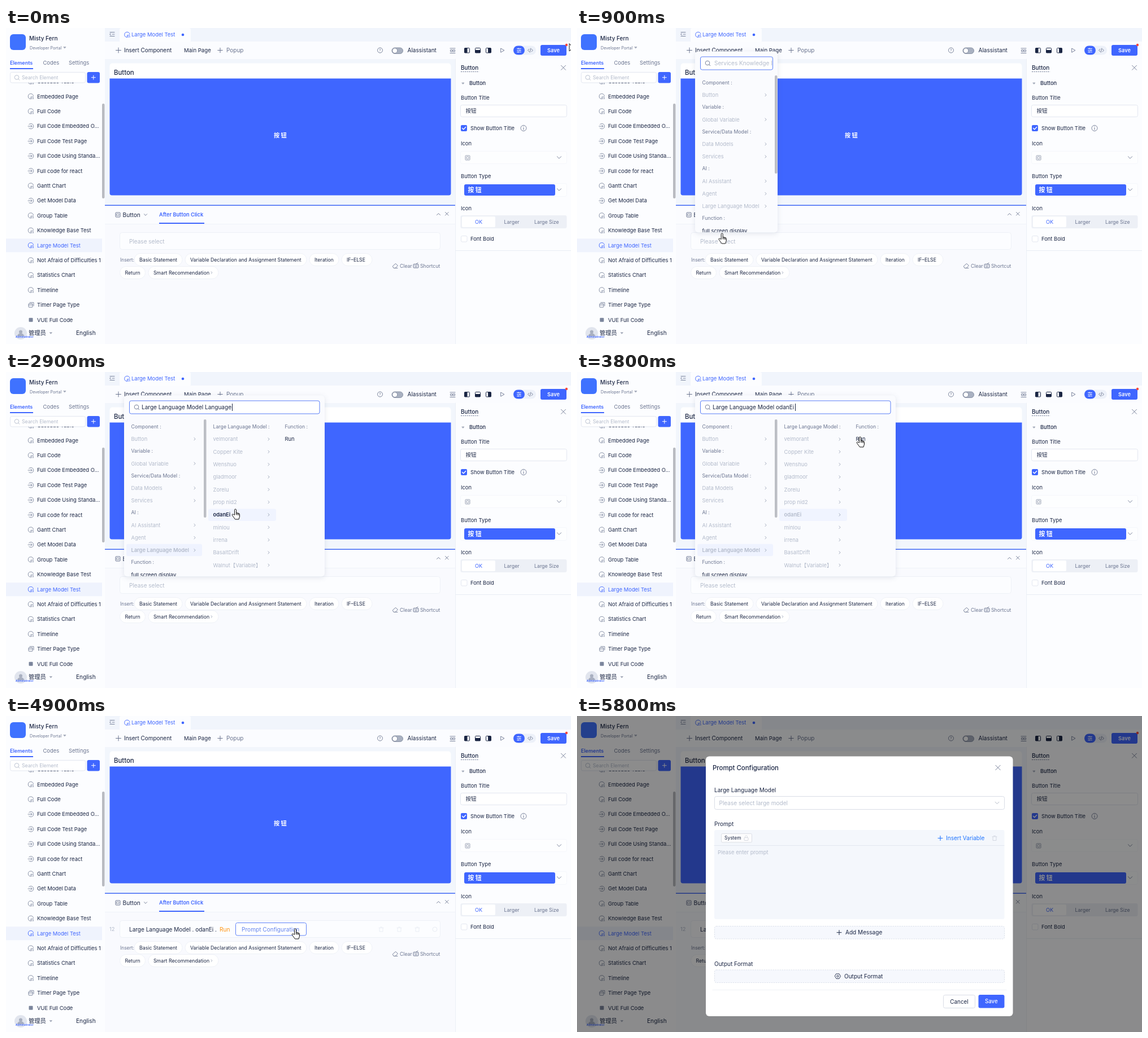
An HTML page that plays this animation: 1000x560 px, repeating every 6.1 s.

```html
<!DOCTYPE html>
<html lang="en">
<head>
<meta charset="utf-8">
<title>Prompt configuration walkthrough</title>
<style>
  html, body { margin: 0; width: 100%; height: 100%; overflow: hidden; background: #fbfcff; }
  svg { display: block; }
  text { font-family: Inter, "Noto Sans CJK SC", "Noto Sans CJK", sans-serif; white-space: pre; }
  #modal { transform-origin: 513px 380px; }
</style>
</head>
<body>
<svg id="stage" width="1000" height="560" viewBox="0 0 1000 560"></svg>
<script>
const LOOP = 6100;
const INK = '#1b2644', SOFT = '#6b7590', FADE = '#b3bbcb', BLUE = '#3f66ff', EDGE = '#e3e7f0', WHITE = '#fff';
const $ = id => document.getElementById(id);

// Drawing helpers; text is centred vertically on y.
const text = (x, y, s, size = 9.4, fill = INK, weight = 400, extra = '') =>
  `<text x="${x}" y="${y}" dy=".36em" font-size="${size}" fill="${fill}" font-weight="${weight}" ${extra}>${s}</text>`;
const rect = (x, y, w, h, fill, rx = 0, stroke = 'none', extra = '') =>
  `<rect x="${x}" y="${y}" width="${w}" height="${h}" rx="${rx}" fill="${fill}" stroke="${stroke}" ${extra}/>`;
const path = (d, stroke = SOFT, width = 1, fill = 'none') =>
  `<path d="${d}" stroke="${stroke}" stroke-width="${width}" fill="${fill}" stroke-linecap="round" stroke-linejoin="round"/>`;
const circle = (x, y, r, fill, stroke = 'none') =>
  `<circle cx="${x}" cy="${y}" r="${r}" fill="${fill}" stroke="${stroke}" stroke-width=".9"/>`;
const group = (id, body) => `<g id="${id}">${body}</g>`;
const clip = (x, y, w, h, body) =>
  `<svg x="${x}" y="${y}" width="${w}" height="${h}" viewBox="${x} ${y} ${w} ${h}">${body}</svg>`;
const plus = (x, y, r, c, w = 1) => path(`M${x - r} ${y}h${2 * r}M${x} ${y - r}v${2 * r}`, c, w);
const cross = (x, y, r, c = SOFT) => path(`M${x - r} ${y - r}l${2 * r} ${2 * r}M${x + r} ${y - r}l${-2 * r} ${2 * r}`, c, .9);
const down = (x, y, r = 3, c = SOFT) => path(`M${x - r} ${y - r / 2}l${r} ${r}l${r} ${-r}`, c, .9);
const right = (x, y, r = 2.2, c = '#98a1b5') => path(`M${x - r / 2} ${y - r}l${r} ${r}l${-r} ${r}`, c, .9);
const caretDown = (x, y) => path(`M${x - 2} ${y - 1}h4l-2 2.4z`, '#9aa2b3', .6, '#9aa2b3');
const lens = (x, y, c) => circle(x, y, 3.8, 'none', c) + path(`M${x + 2.8} ${y + 2.8}l2 2`, c);
const trash = (x, y, c) => path(`M${x - 4} ${y - 2.6}h8M${x - 1.5} ${y - 4}h3M${x - 3} ${y - 2.6}v6.6h6v-6.6`, c, .8);

const glyphs = {
  page: (x, y, c) => path(`M${x + 4.4} ${y - 1}a4.6 4.6 0 1 0 -5 5.4M${x} ${y + 4.4}v-3.6h4.4M${x + 2} ${y + 4.4}v-1.5M${x + 4.4} ${y + 4.4}v-2`, c, .9),
  code: (x, y, c) => path(`M${x - 3.4} ${y - 3.2}a4.7 4.7 0 1 1 0 6.4M${x - 5} ${y}h7M${x} ${y - 2.2}l2.2 2.2l-2.2 2.2`, c, .9),
  timer: (x, y, c) => rect(x - 4, y - 2.5, 7, 6.5, 'none', 1, c) + path(`M${x - 2} ${y - 4.5}h7v6M${x - 4} ${y}h7`, c, .9),
  plain: (x, y, c) => rect(x - 3.5, y - 3.5, 7, 7, c, 1),
};

function sidebar() {
  const items = [
    ['page', 'Cascade Table'], ['page', 'Embedded Page'], ['page', 'Full Code'], ['code', 'Full Code Embedded O...'],
    ['code', 'Full Code Test Page'], ['code', 'Full Code Using Standa...'], ['code', 'Full code for react'],
    ['page', 'Gantt Chart'], ['code', 'Get Model Data'], ['page', 'Group Table'], ['page', 'Knowledge Base Test'],
    ['page', 'Large Model Test'], ['page', 'Not Afraid of Difficulties 1'], ['page', 'Statistics Chart'],
    ['page', 'Timeline'], ['timer', 'Timer Page Type'], ['plain', 'VUE Full Code'],
  ];
  const list = items.map(([kind, label], i) => {
    const y = 94.9 + 26.4 * i, on = i === 11;
    return (on ? rect(0, y - 12, 170, 24, '#eff3fd') : '') +
      glyphs[kind](44, y, on ? BLUE : '#7b859c') + text(55, y, label, 9.4, on ? BLUE : INK);
  }).join('');
  return rect(0, 0, 175, 560, '#fcfdff') +
    rect(7, 11, 28, 28, '#3f72ff', 6) +
    text(41, 18, 'Misty Fern', 10, INK, 500) + text(42, 35, 'Developer Portal', 7.15, SOFT) + caretDown(104, 34.5) +
    text(7, 61.5, 'Elements', 9.05, BLUE, 600) + text(65.5, 61.5, 'Codes', 9.4, SOFT) + text(111, 61.5, 'Settings', 9.4, SOFT) +
    rect(7, 71, 41, 2, BLUE) +
    rect(7.5, 78.5, 133, 18.5, WHITE, 3, EDGE) + lens(19, 87.5, FADE) + text(28, 88, 'Search Element', 8.7, FADE) +
    rect(143.5, 78, 22.5, 19.5, BLUE, 3) + plus(154.8, 87.7, 3.5, WHITE) +
    clip(0, 97, 170, 429, list) + rect(170, 134, 4.5, 168, '#b9bbc1', 2) +
    circle(26, 541, 11, '#e1e5ee') + circle(26, 538.5, 3, '#a9b0c0') + path('M20 546a6 5 0 0 1 12 0z', 'none', 0, '#a9b0c0') +
    text(17, 547, 'Administrator', 4.8, BLUE, 600) + text(40, 540.5, '管理员', 10.3) + caretDown(79.5, 540.5) +
    text(124, 540.5, 'English', 10.2);
}

function header() {
  const box = (x, d) => rect(x - 4.5, 35.5, 9, 8.5, 'none', 1, INK) + path(d, INK, 1, INK);
  return rect(175, 0, 825, 24, '#f1f5fc') + rect(201, 0, 126, 25, '#fcfdff', 3) + rect(175, 24, 825, 31, '#fbfcff') +
    path('M184 7.5h8M188 11h4M184 14.5h8M185.5 9.5l-2 1.5l2 1.5', SOFT, .9) +
    glyphs.page(214.5, 12, BLUE) + text(222, 12, 'Large Model Test', 9.45, BLUE) + circle(313, 12, 2.3, BLUE) +
    plus(199, 39.5, 4.5, SOFT) + text(209, 39.5, 'Insert Component', 9.95) + text(315, 39.5, 'Main Page', 9.6) +
    plus(379, 39.5, 4.2, SOFT) + text(390, 39.5, 'Popup', 10, SOFT) +
    circle(662, 39.5, 4.5, 'none', SOFT) + text(662, 39.7, '?', 6.5, SOFT, 400, 'text-anchor="middle"') +
    rect(683, 35, 19.5, 10.5, '#a9b1c1', 5.2, '#8a93a6') + circle(688.3, 40.2, 4.4, WHITE, '#7f889d') +
    text(710.5, 39.5, 'Alassistant', 10, INK) +
    path('M786 36h9M786 44.5h9M787 38.8h3v3h-3zM791.5 38.8h3v3h-3z', SOFT, .9) +
    box(816, 'M812 36h4v7.5h-4z') + box(835, 'M831 39.5h8v4h-8z') + box(854, 'M854 36h4v7.5h-4z') +
    path('M876 36.2l6 3.4l-6 3.4z', SOFT, .9) +
    rect(898, 31.5, 40, 16, '#edf1f9', 8) + rect(898, 31.5, 20, 16, BLUE, 8) +
    path('M904.5 36.5h7M904.5 39.5h7M904.5 42.5h7M907 35.7v1.6M909.5 38.7v1.6M906.5 41.7v1.6', WHITE, .9) +
    path('M926 37.2l-2.4 2.4l2.4 2.4M930 37.2l2.4 2.4l-2.4 2.4M928.8 36l-1.6 7', SOFT, .9) +
    rect(946, 30, 46, 19, BLUE, 3) + text(969, 39.7, 'Save', 9.2, WHITE, 600, 'text-anchor="middle"') + circle(992, 30, 2.2, '#f5483f');
}

function canvasArea() {
  const handle = (x, y, w, h) => rect(x, y, w, h, WHITE, 1.2, BLUE);
  const face = fill => path('M183.5 89.5h604v203a4 4 0 0 1 -4 4h-596a4 4 0 0 1 -4 -4z', 'none', 0, fill);
  return rect(175, 55, 621, 259, '#f2f6fc') + rect(183.5, 62.5, 604, 234, WHITE, 5) +
    text(191, 79, 'Button', 11.4, INK, 500) + face(BLUE) + group('glow', face(WHITE)) +
    text(474, 190, '按 钮', 10.2, WHITE, 700) +
    group('tools',
      rect(183.5, 62.5, 604, 234, 'none', 4, BLUE) +
      rect(704, 62, 56, 21.5, BLUE, 2) + rect(761, 62, 26.5, 21.5, BLUE, 2) +
      path('M713.5 73v-4.5a1 1 0 0 1 2 0v3l3 .8v2.7l-1 2h-3.5l-2.5-3z', WHITE, .8) + text(724, 72.8, 'Events', 9.2, WHITE, 500) +
      [769, 773, 777].map(x => circle(x, 72.8, 1, WHITE)).join('') +
      handle(785.5, 179.5, 3, 9) + handle(485, 294.5, 9, 3) + handle(784, 293.5, 4, 4));
}

function statements() {
  const chip = (x, w, y, label) => rect(x, y - 11, w, 22, WHITE, 11, '#eef1f7') + text(x + 9, y, label, 8.75);
  return rect(175, 314, 621, 246, '#f9fafe') + rect(175, 315, 621, 32, '#fbfcff') + rect(175, 313.5, 621, 1.5, '#4068f5') +
    path('M175 347.5h620', '#f0f3f9', 1) +
    rect(194, 327, 8, 8, 'none', 1, SOFT) + path('M196 329.5h4v3h-4z', SOFT, .7) + text(206.5, 331, 'Button', 10.2) + down(247, 331, 2.6) +
    text(271, 331, 'After Button Click', 9.2, BLUE, 600) + rect(271, 345, 80, 2, BLUE) +
    path('M762.5 331.5l3-3l3 3', SOFT, .9) + cross(780.3, 329.3, 2.8) +
    rect(201.5, 362.5, 567, 30, '#fcfdff', 4, '#eef1f7') +
    group('rowTools', [664, 696, 728].map(x => trash(x, 378, '#e6eaf2')).join('') + circle(759, 378, 4, 'none', '#e6eaf2')) +
    group('empty', text(218, 378, 'Please select', 10, FADE)) +
    group('filled',
      text(183, 378, '12', 9.4, FADE) + text(218, 378, 'Large Language Model . odanEi .', 10) +
      text(378, 378, 'Run', 10.2, '#ff9514') +
      rect(406.5, 366.5, 125, 22.5, WHITE, 3, '#dfe3ec', 'id="promptBox"') + text(417, 378, 'Prompt Configuration', 10.1, INK, 400, 'id="promptText"')) +
    text(202, 410.5, 'Insert:', 8.4, SOFT) +
    chip(227, 85, 410.5, 'Basic Statement') + chip(317, 215, 410.5, 'Variable Declaration and Assignment Statement') +
    chip(537, 52, 410.5, 'Iteration') + chip(594, 54, 410.5, 'IF–ELSE') +
    chip(201.5, 45, 433.5, 'Return') + chip(252, 124, 433.5, 'Smart Recommendation') + right(364, 433.5, 1.8) +
    path('M684.5 422l5-4.5l4 3.5l-4.5 4.5h-2.5zM688 425.5h5', SOFT, .9) + text(697, 421.5, 'Clear', 8.65, SOFT) +
    rect(721, 418.5, 9, 6.5, 'none', 1, SOFT) + path('M723 421h5M724 423h3M726 418l3-2', SOFT, .8) + text(733, 421.5, 'Shortcut', 8.75, SOFT);
}

function inspector() {
  return rect(796, 55, 204, 505, '#fcfdff') + path('M795.5 55v505', '#eceff6') + path('M796 394.5h204', '#e9edf4') +
    text(805, 70, 'Button', 10, INK, 500) + `<path d="M805 77.5h32" stroke="${SOFT}" stroke-dasharray="2 1.5"/>` + cross(986.5, 70.3, 4) +
    caretDown(809, 98) + text(820, 98, 'Button', 9.3, INK, 500) +
    text(805, 124, 'Button Title') + rect(804.5, 136.5, 188, 21, WHITE, 3, EDGE) + text(813.5, 147, '按钮', 9.5) +
    rect(805, 172, 11, 11, BLUE, 2) + path('M807.5 177.5l2.2 2.2l4-4.3', WHITE, 1.4) +
    text(822, 178, 'Show Button Title') + circle(916, 177.5, 5, 'none', SOFT) + path('M916 177v3M916 174.8v.2', SOFT, 1) +
    text(805, 205, 'Icon') + rect(804.5, 218.5, 188, 22, '#fdfeff', 3, '#f5f7fb') +
    rect(813, 226, 8, 8, 'none', 1, '#9ca4b5') + rect(815, 228, 4, 4, 'none', .5, '#9ca4b5') + down(979, 229.5, 3.6) +
    text(805, 262.5, 'Button Type') + rect(804.5, 275.5, 188, 23, '#fdfeff', 3, '#f5f7fb') +
    rect(811, 277, 161, 20, BLUE, 3) + text(817.5, 286.8, '按 钮', 10.8, WHITE, 700) + down(979, 286.5, 3.6) +
    text(805, 320, 'Icon') + rect(804.5, 332, 188, 23, '#edf0f6', 3) + rect(807, 334, 59, 19, WHITE, 2) +
    text(830, 343.5, 'OK', 9.2, BLUE) + text(881.5, 343.5, 'Larger', 8.9, SOFT) + text(935, 343.5, 'Large Size', 8.8, SOFT) +
    rect(805.5, 368.5, 10.5, 10.5, WHITE, 2, EDGE) + text(822, 374, 'Font Bold');
}

function picker() {
  const main = [['Component :'], ['Button', 1], ['Variable :'], ['Global Variable', 1], ['Service/Data Model :'], ['Data Models', 1],
    ['Services', 1], ['AI :'], ['AI Assistant', 1], ['Agent', 1], ['Large Language Model', 1, 'llm'], ['Function :']];
  const models = ['velmorant', 'Copper Kite', 'Wenshuo', 'gladmoor', 'Zorelu', 'prop nid2', 'odanEi', 'minlou', 'irrena', 'BasaltDrift', 'Walnut【Variable】'];
  let y = 96.5;
  const first = main.map(([label, leaf, id], i) => {
    if (i) y += leaf ? 22.2 : 21.3;
    return (id ? rect(213, y - 11, 134, 21.5, '#eff3ff', 3, 'none', 'id="llmBack"') : '') +
      text(221.5, y, label, leaf ? 9.3 : 8.75, leaf ? FADE : SOFT, 400, id ? `id="${id}"` : '') + (leaf ? right(334, y) : '');
  }).join('');
  const second = models.map((label, i) => {
    const y = 119 + 22.33 * i;
    return rect(358, y - 10.5, 120, 21.5, '#f0f4ff', 3, 'none', `id="back${i}" opacity="0"`) +
      text(366.5, y, label, 9.35, FADE, 400, `id="model${i}"`) + right(465, y);
  }).join('');
  const typed = (id, tail) => group(id, text(240, 62.5, 'Large Language Model' + tail, 10.05));
  return group('picker',
    rect(209, 41.5, 146, 321, '#fafbfe', 6, 'none', 'id="sheet" style="filter:drop-shadow(0 2px 5px rgba(40,55,100,.12))"') +
    rect(218.5, 51, 128, 23, WHITE, 3, '#5a7ff7', 'id="field"') + lens(231, 62, SOFT) +
    `<svg id="hint" x="240" y="52" width="105" height="20">${text(3, 10.5, 'Services Knowledge Base Test Query', 10.05, FADE)}</svg>` +
    typed('typedA', '') + typed('typedB', ' Language') + typed('typedC', ' odanEi') + rect(350, 56, 1, 13, INK, 0, 'none', 'id="caret"') +
    clip(209, 76, 142, 286, first + text(221.5, 359.5, 'full screen display', 9.3)) + rect(350, 84, 4.5, 174, '#bcbec4', 2) +
    group('colB', text(366.5, 96.5, 'Large Language Model :', 8.75, SOFT) + second) +
    group('colC', text(493.5, 96.5, 'Function :', 8.75, SOFT) + text(493.5, 119, 'Run', 9.4)));
}

function dialog() {
  const wide = (y, label, x) => rect(243.5, y, 513, 22.5, '#f6f8fd', 3, '#dce1eb', 'stroke-dasharray="2.5 1.5"') + text(x, y + 11.2, label, 10.05);
  return group('shade', rect(0, 0, 1000, 560, '#000')) + group('modal',
    rect(228, 71.5, 543.5, 460.5, WHITE, 6) + text(240, 91.5, 'Prompt Configuration', 11.4, INK, 500) + cross(745, 91.5, 4.2) +
    text(243, 131, 'Large Language Model', 10.05) + rect(243.5, 142.5, 513, 23, WHITE, 3, '#d9dde6') +
    text(251.5, 154, 'Please select large model', 10.05, FADE) + down(743.5, 154, 3.4, '#a9b0bf') +
    text(243, 191, 'Prompt', 10.05) + rect(243, 202, 513.5, 158, '#f4f7fc', 3) + path('M243 229.5h513', '#e2e7f0') +
    rect(255.5, 208.5, 54, 15.5, '#fcfcfd', 2, '#dcdfe6') + text(261, 216.3, 'System', 8.45) +
    rect(296, 215.5, 7, 5, 'none', .8, '#d5d8df') + path('M297.5 215.5v-1.5a2 2 0 0 1 4 0v1.5', '#d5d8df', .8) +
    plus(643, 216.5, 4, '#1f74ff', 1.1) + text(653, 216.5, 'Insert Variable', 10.05, '#1f74ff') + trash(739, 216.5, '#ccd1dc') +
    text(249, 241.5, 'Please enter prompt', 9.4, FADE) +
    wide(372.5, 'Add Message', 475) + plus(464, 383.7, 4, INK) +
    text(243, 439, 'Output Format', 10.05) + wide(450, 'Output Format', 473) +
    path('M459 456.9h5l2.5 4.3l-2.5 4.3h-5l-2.5-4.3z', INK, .9) + circle(461.5, 461.2, 1.7, 'none', INK) +
    path('M240 485.5h520', '#f0f2f7') +
    rect(648.5, 494.5, 56, 23, WHITE, 3, '#d9dde6') + text(676.5, 506, 'Cancel', 9.9, INK, 400, 'text-anchor="middle"') +
    rect(710.5, 494, 46, 23.5, BLUE, 3) + text(733.3, 506, 'Save', 9.7, WHITE, 500, 'text-anchor="middle"'));
}

const pointer = group('cursor',
  group('arrow', path('M0 0v13l3.1-2.7l2.2 4.8l2.1-1l-2.2-4.6h4z', '#111', 1, WHITE)) +
  group('hand', path('M-1.5 10v-8.5a1.5 1.5 0 0 1 3 0v5l4.5 1a2 2 0 0 1 1.5 2v3.5l-1.5 5h-6.5l-5-7a1.3 1.3 0 0 1 2-1.7zM1.5 6.5v3.5M3.7 7.2v3M5.8 7.7v3', '#111', 1, WHITE)));

$('stage').innerHTML = rect(0, 0, 1000, 560, '#fbfcff') + header() + canvasArea() + statements() +
  inspector() + sidebar() + picker() + dialog() + pointer;

// Each table row is [ms, value]; a value holds until the next row.
function hold(id, prop, rows) {
  const frames = rows.map(([ms, v]) => ({ offset: ms / LOOP, [prop]: v, easing: 'steps(1, end)' }));
  frames.push({ offset: 1, [prop]: rows[rows.length - 1][1] });
  $(id).animate(frames, { duration: LOOP, iterations: Infinity });
}
const show = (id, ...flips) => hold(id, 'opacity', [[0, flips[0] === 0 ? 1 : 0],
  ...flips.map((ms, i) => [ms, i % 2 ? 0 : 1]).filter(row => row[0] > 0)]);

// Pointer route, sampled every 100 ms.
const route = [[0, 997, 28], [200, 430, 300], [300, 319, 359], [500, 262, 384], [700, 262, 384], [1000, 254, 354],
  [1700, 248, 309], [1800, 248, 309], [2300, 372, 297], [2500, 386, 292], [2600, 390, 284], [2900, 406, 243],
  [3200, 484, 240], [3500, 497, 146], [3800, 501, 115], [4000, 501, 115], [4200, 497, 245], [4400, 509, 358],
  [4700, 512, 377], [4900, 512, 377], [5300, 790, 200], [5500, 912, 138], [5800, 1012, 45], [6100, 1012, 45]];
const samples = Array.from({ length: LOOP / 100 }, (_, i) => {
  const ms = i * 100, k = route.findIndex(p => p[0] > ms), [a, b] = [route[k - 1], route[k]];
  const f = (ms - a[0]) / (b[0] - a[0]);
  return [ms, `translate(${a[1] + (b[1] - a[1]) * f}px, ${a[2] + (b[2] - a[2]) * f}px)`];
});
hold('cursor', 'transform', samples);
show('arrow', 0, 100, 300, 400, 5000);
show('hand', 100, 300, 400, 5000);

hold('glow', 'opacity', [[0, 0], [100, .12], [200, .2], [300, .07], [400, 0], [4100, .1], [4200, .2], [4300, .07], [4400, 0]]);
show('tools', 100, 300, 4100, 4300);
show('rowTools', 400, 700, 4400);
show('empty', 0, 4100);
show('filled', 4100);
hold('promptBox', 'stroke', [[0, '#dfe3ec'], [4500, '#5f82f8']]);
hold('promptText', 'fill', [[0, INK], [4500, '#6484ee']]);

hold('picker', 'opacity', [[0, 0], [700, .6], [800, 1], [4100, 0]]);
hold('sheet', 'width', [[0, '146px'], [1500, '273px'], [2200, '355px']]);
hold('field', 'width', [[0, '128px'], [1500, '254.5px'], [2200, '336.5px']]);
hold('hint', 'width', [[0, '105px'], [1500, '232px']]);
show('colB', 1500);
show('colC', 2200);
show('hint', 0, 1900);
show('typedA', 1900, 2600);
show('typedB', 2600, 3300);
show('typedC', 3300);
show('caret', 1900);
hold('caret', 'x', [[0, '350px'], [2600, '400px'], [3300, '386px']]);

show('llmBack', 1400);
hold('llm', 'fill', [[0, FADE], [1400, INK], [2200, FADE]]);
hold('llm', 'fontWeight', [[0, 400], [1400, 600]]);
function hover(i, from, to, picked) {
  show('back' + i, from, ...(picked ? [] : [to]));
  hold('model' + i, 'fill', [[0, FADE], [from, INK], [to, FADE]]);
  hold('model' + i, 'fontWeight', picked ? [[0, 400], [from, 600]] : [[0, 400], [from, 600], [to, 400]]);
}
hover(8, 2200, 2700);
hover(6, 2700, 3200, true);

hold('shade', 'opacity', [[0, 0], [5000, .1], [5100, .27], [5200, .4], [5300, .45]]);
hold('modal', 'opacity', [[0, 0], [5000, .2], [5100, .65], [5200, .95], [5300, 1]]);
hold('modal', 'transform', [[0, 'scale(.2)'], [5000, 'scale(.35)'], [5100, 'scale(.75)'], [5200, 'scale(.95)'], [5300, 'scale(1)']]);
</script>
</body>
</html>
```
